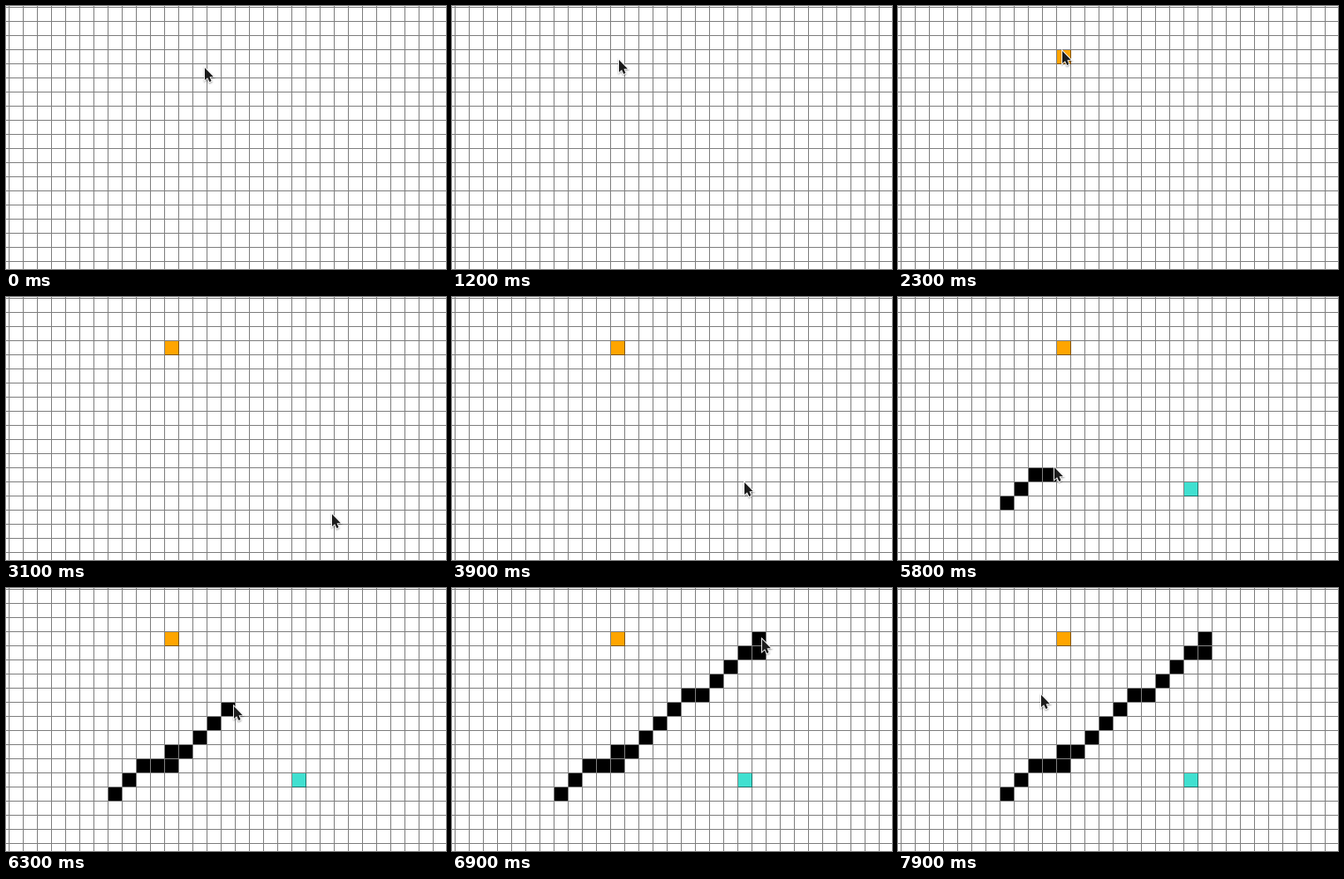
Write an HTML page with a canvas that moves like this. It is 498x298 px and loops after 8 s.

```html
<!DOCTYPE html>
<html lang="en">
<head>
<meta charset="utf-8">
<title>Grid painting</title>
<style>
  html, body { margin: 0; width: 100%; height: 100%; overflow: hidden; background: #fff; }
  canvas { display: block; }
</style>
</head>
<body>
<canvas id="stage" width="498" height="298"></canvas>
<script>
const ctx = document.getElementById('stage').getContext('2d');
const WIDTH = 498, HEIGHT = 298, LOOP = 8000, STEP = 100;
const CELL = 16, LEFT = 3, TOP = 1;
const PRESS = 5300; // the black stroke begins

const smooth = k => k * k * k * (k * (6 * k - 15) + 10);
const linear = k => k;
const mix = (a, b, k) => Math.round(a + (b - a) * k);

// Pointer moves; it rests in between
const start = { x: 225, y: 70 };
const moves = [
  { from: 0, to: 400, x: 218, y: 67 },
  { from: 500, to: 700, x: 192, y: 62 },
  { from: 1000, to: 1200, x: 189, y: 61 },
  { from: 1800, to: 2100, x: 186, y: 51 },
  { from: 2400, to: 3200, x: 372, y: 249 },
  { from: 3200, to: 3700, x: 333, y: 214 },
  { from: 3800, to: 3900, x: 331, y: 210 },
  { from: 4500, to: 5000, x: 131, y: 230 },
  { from: 5100, to: PRESS, x: 129, y: 228 },
  { from: 5500, to: 6300, x: 258, y: 134, ease: linear },
  { from: 6300, to: 6900, x: 351, y: 58, ease: linear },
  { from: 7400, to: 7900, x: 162, y: 121 }
];

// The stroke goes cell by cell: Diagonally up, Right or Up
const stroke = [{ col: 7, row: 14 }];
for (const turn of 'DDRRURDDDDRDDDRU') {
  const { col, row } = stroke[stroke.length - 1];
  stroke.push({ col: col + (turn !== 'U'), row: row - (turn !== 'R') });
}

const grid = new Path2D();
for (let x = LEFT; x < WIDTH; x += CELL) grid.rect(x, 0, 1, HEIGHT);
for (let y = TOP; y < HEIGHT; y += CELL) grid.rect(0, y, WIDTH, 1);

const arrow = new Path2D('M0 0V14L3.1 11.2L5.3 16L7.5 15L5.5 10.2H9.9Z');

function tipAt(t) {
  let tip = start;
  for (const { from, to, x, y, ease = smooth } of moves) {
    if (t <= from) break;
    const k = ease(Math.min(1, (t - from) / (to - from)));
    tip = { x: mix(tip.x, x, k), y: mix(tip.y, y, k) };
  }
  return tip;
}

function paintCell(col, row, colour, size) {
  ctx.fillStyle = colour;
  ctx.fillRect(LEFT + 1 + col * CELL, TOP + 1 + row * CELL, size, size);
}

function drawStroke(t) {
  const reach = tipAt(Math.min(t, 6900));
  for (const { col, row } of stroke) {
    const reached = LEFT + col * CELL <= reach.x && TOP + (row + 1) * CELL >= reach.y;
    if (reached) paintCell(col, row, '#000', CELL - 1);
  }
}

function drawPointer({ x, y }) {
  ctx.save();
  ctx.translate(x, y);
  ctx.shadowColor = 'rgba(0,0,0,.4)';
  ctx.shadowBlur = 2;
  ctx.shadowOffsetY = 1;
  ctx.strokeStyle = '#fff';
  ctx.lineWidth = 1.8;
  ctx.stroke(arrow);
  ctx.shadowColor = 'transparent';
  ctx.fillStyle = '#1c1c1c';
  ctx.fill(arrow);
  ctx.restore();
}

function frame() {
  const t = Math.floor(performance.now() % LOOP / STEP) * STEP;
  ctx.fillStyle = '#fff';
  ctx.fillRect(0, 0, WIDTH, HEIGHT);
  if (t >= 2300) paintCell(11, 3, '#ffa500', CELL);
  if (t >= 4200) paintCell(20, 13, '#40e0d0', CELL);
  if (t >= PRESS) drawStroke(t);
  ctx.fillStyle = 'rgba(0,0,0,.5)';
  ctx.fill(grid);
  drawPointer(tipAt(t));
  requestAnimationFrame(frame);
}
frame();
</script>
</body>
</html>
```
